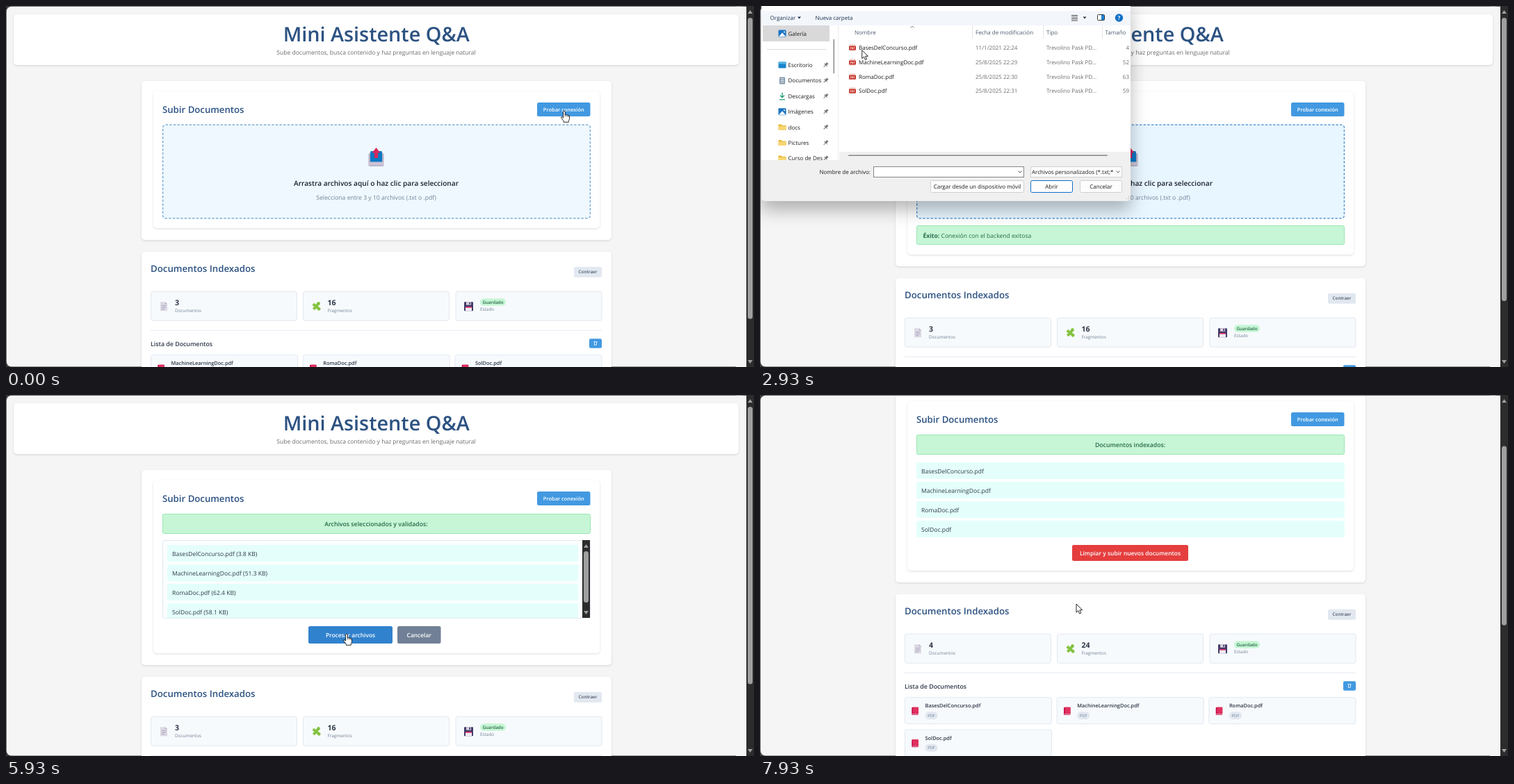
An HTML page that plays this animation: 1076 px wide and 520 px high, repeating every 8 s.

```html
<!DOCTYPE html>
<html lang="es">
<head>
<meta charset="utf-8">
<style>
html, body { margin: 0; width: 100%; height: 100%; overflow: hidden; background: #2c2c2c; }
svg { display: block; }
text { font-family: "Open Sans", "Noto Sans", sans-serif; white-space: pre; text-rendering: geometricPrecision; }
.card { filter: drop-shadow(0 1px 1.5px rgba(0,0,0,.13)); }
.window { filter: drop-shadow(0 13px 12px rgba(0,0,0,.28)); }
</style>
</head>
<body>
<svg id="stage" width="1076" height="520" viewBox="0 0 1076 520"></svg>
<script>
const LOOP = 8000, NAVY = '#2c5282', GREY = '#718096', INK = '#2d3748';
const FILES = [['BasesDelConcurso.pdf', '3.8', '11/1/2021 22:24', 4], ['MachineLearningDoc.pdf', '51.3', '25/8/2025 22:29', 52],
  ['RomaDoc.pdf', '62.4', '25/8/2025 22:30', 63], ['SolDoc.pdf', '58.1', '25/8/2025 22:31', 59]];

const clamp = v => Math.max(0, Math.min(1, v));
const smooth = v => (v = clamp(v), v * v * (3 - 2 * v));
const mix = (a, b, k) => `rgb(${a.map((v, i) => v + (b[i] - v) * k)})`;

const rect = (x, y, w, h, fill, r = 0, more = '') =>
  `<rect x="${x}" y="${y}" width="${w}" height="${h}" rx="${r}" fill="${fill}" ${more}/>`;
const boxed = (x, y, w, h, fill, line, r = 2) =>
  rect(x + .5, y + .5, w - 1, h - 1, fill, r, `stroke="${line}"`);
const text = (x, y, s, size, fill, weight = 400, anchor = 'start') =>
  `<text x="${x}" y="${y}" font-size="${size}" fill="${fill}" font-weight="${weight}" text-anchor="${anchor}">${s}</text>`;
const mid = (x, y, s, size, fill, weight) => text(x, y, s, size, fill, weight, 'middle');
const path = (d, fill, more = '') => `<path d="${d}" fill="${fill}" ${more}/>`;
const line = (d, color, w = 1) => path(d, 'none', `stroke="${color}" stroke-width="${w}"`);
const at = (x, y, s) => `<g transform="translate(${x} ${y})">${s}</g>`;
const clip = (x, y, w, h, s) => `<svg x="${x}" y="${y}" width="${w}" height="${h}" viewBox="${x} ${y} ${w} ${h}">${s}</svg>`;
const card = (x, y, w, h, r = 5) => rect(x, y, w, h, '#fff', r, 'class="card"');
const button = (x, y, w, h, fill, s, size, color = '#fff') =>
  rect(x, y, w, h, fill, 2.5) + mid(x + w / 2, y + h / 2 + size * .36, s, size, color, 600);

function scrollbar(x, y, h, top, len) {
  const c = x + 5.5, b = y + h;
  return rect(x, y, 11, h, '#2c2c2c') + rect(x + 2, top, 7, len, '#9f9f9f', 3.5) +
    path(`M${c - 3.5} ${y + 11}h7l-3.5 -5zM${c - 3.5} ${b - 10}h7l-3.5 5z`, '#9f9f9f');
}

const ICON = {
  upload: rect(-11, -6, 22, 19, '#b9b1c4', 2) + rect(-8.5, -9, 17, 17, '#0b78c4', 1.5) + rect(-10.5, 6.5, 21, 5, '#cdc4d6', 1) +
    path('M0-14 6-6.5H2.6V1h-5.2v-7.5H-6z', '#d8285c'),
  page: path('M-5-6.5H2L5-3.5V6.5H-5z', '#dcd8e4') + path('M2-6.5V-3.5H5z', '#b4acbc') + line('M-3-1H3M-3 1.5H3M-3 4H1', '#a9a3b8', .9),
  puzzle: `<g transform="rotate(40)">${line('M-5.5 0H5.5M0-5.5V5.5', '#84c341', 4)}
    <g fill="#84c341"><circle cx="0" cy="-5.5" r="2.4"/><circle cx="5.5" cy="0" r="2.4"/></g></g>`,
  disk: rect(-6.5, -6.5, 13, 13, '#433b6b', 1) + rect(-3.5, -6.5, 7, 4.5, '#d5d0dc') + rect(.8, -5.8, 1.6, 3, '#433b6b') +
    rect(-4.5, .3, 9, 6.2, '#f0ecf5') + rect(-4.5, .3, 9, 1.6, '#d8285c'),
  book: rect(-4.7, -5.5, 9.5, 11, '#ca0b4a', 1) + rect(-3, -5.5, 7.8, 9, '#e0315f', .5) + line('M-3.7 4.3H4.5', '#f0dbe4', .7),
  pdf: rect(-4.5, -5, 9, 10, '#f3d9d6', 1) + rect(-5, -2.5, 10, 6, '#c8372d', .8) + mid(0, 2, 'PDF', 3.6, '#fff', 700),
  folder: path('M-5.5-4h4l1.5 1.5h5.5V4h-11z', '#e8b93c') + rect(-5.5, -1.5, 11, 5.5, '#f7d674', .8),
  desktop: rect(-5.5, -4.5, 11, 9, '#1b84c8', 1) + rect(-5.5, -4.5, 11, 3, '#55b7e6', 1),
  papers: rect(-4, -5, 8, 10, '#7c93a8', 1) + line('M-2.5-2.5h5M-2.5 0h5M-2.5 2.5h5', '#fff', 1),
  down: line('M0-5V2M-3-1 0 2 3-1M-4 5H4', '#1f9d76', 1.3),
  photo: rect(-5.5, -5, 11, 10, '#1b74c5', 1.2) + path('M-5 4.5 0-1 5 4.5z', '#fff') + rect(2, -3, 2, 2, '#fff', 1),
  pin: `<g transform="rotate(45)">${rect(-1.5, -4, 3, 4, '#777')}${line('M-3 0H3M0 0V4', '#777', 1)}</g>`,
  arrow: path('M0 0V12.2L2.8 9.6 4.7 14 6.8 13.1 4.9 8.8H8.7z', '#fff', 'stroke="#111" stroke-width=".9" stroke-linejoin="round"'),
  hand: path('M-1.4 1Q0-.8 1.3 1V6Q2.6 4.9 3.7 6.2 5 5.4 5.8 6.8 7.2 6.2 7.5 8V11.5Q7.2 13.2 6.3 14.3V16.3H-.7V14.8L-4.3 10.2Q-4.6 8.2-2.8 8.8L-1.4 10.2z',
    '#fff', 'stroke="#111" stroke-width=".9" stroke-linejoin="round"') + line('M1.3 5.5V8.5M3.7 6.2V8.7M5.8 6.8V9', '#111', .6)
};

// Pointer tip: time, x, y
const TRACK = [[0, 803, 151], [480, 803, 151], [600, 700, 190], [670, 654, 202], [770, 608, 209], [870, 588, 210], [930, 572, 210],
  [1530, 572, 210], [1750, 500, 203], [2270, 273, 163], [2470, 215, 115], [2900, 150, 65], [3200, 124, 53], [3600, 124, 53], [3804, 175, 88],
  [4000, 215, 130], [4130, 235, 138], [4400, 424, 264], [4470, 424, 264], [4930, 446, 263], [5610, 446, 263], [5900, 490, 344],
  [6250, 490, 344], [6600, 455, 301], [LOOP, 455, 301]];
function pointer(t) {
  const i = Math.max(1, TRACK.findIndex(k => k[0] >= t)), [a, b] = [TRACK[i - 1], TRACK[i]];
  const k = clamp((t - a[0]) / (b[0] - a[0]));
  return [a[1] + (b[1] - a[1]) * k, a[2] + (b[2] - a[2]) * k];
}

function uploadBody(t) {
  const hover = t < 600 ? clamp(.6 - t / 300) : smooth((t - 590) / 300);
  return rect(225.6, 171.1, 614.8, 134.8, mix([247, 250, 252], [232, 246, 255], hover), 4,
      `stroke="${mix([160, 188, 214], [58, 135, 204], hover)}" stroke-width="1.2" stroke-dasharray="3.4 2.25"`) +
    at(532.5, 218, ICON.upload) +
    mid(532.5, 259, 'Arrastra archivos aquí o haz clic para seleccionar', 10.15, '#1a202c', 600) +
    mid(532.5, 279, 'Selecciona entre 3 y 10 archivos (.txt o .pdf)', 8.6, GREY) +
    (t < 270 ? '' : boxed(225, 316, 616, 28, '#c6f6d5', '#9ae6b4') +
      text(234.5, 333.5, '<tspan font-weight="700">Éxito:</tspan> Conexión con el backend exitosa', 8.55, '#276749'));
}

const banner = s => boxed(225, 171, 616, 29, '#c6f6d5', '#9ae6b4') + mid(532.5, 189, s, 8.72, '#276749', 600);
const rows = (x, y, w, label) => FILES.map((f, i) =>
  rect(x, y + 28 * i, w, 24, '#e4fffb', 2) + text(x + 7, y + 15.5 + 28 * i, label(f), 8.55, INK)).join('');

function pickedBody(t, working) {
  const spin = (t - 6300) * .36;
  return banner('Archivos seleccionados y validados:') + boxed(225, 209, 616, 113, '#fbfdfe', '#e2e8f0') +
    clip(226, 210, 603, 111, rows(232, 216, 591, f => `${f[0]} (${f[1]} KB)`)) + scrollbar(829, 209, 112, 225, 74) +
    (working ? button(447, 333, 101.5, 25, '#a0aec0', 'Procesando...', 8.4) + button(555.5, 333, 62.5, 25, '#a0aec0', 'Cancelar', 8.4) +
      `<circle cx="533" cy="388" r="6" fill="none" stroke="#e2e8f0" stroke-width="1.5"/>` +
      at(533, 388, `<g transform="rotate(${spin})">${line('M-4.24-4.24A6 6 0 0 1 4.24-4.24', '#3f93dc', 1.6)}</g>`) +
      mid(532.5, 411.5, 'Procesando archivos y construyendo índice...', 8.45, '#4a5568')
    : button(435, 333, 121, 25, t > 5850 ? '#3182ce' : '#4299e1', 'Procesar archivos', 8.4) +
      button(563, 333, 62.5, 25, GREY, 'Cancelar', 8.4));
}

const doneBody = () => banner('Documentos indexados:') + rows(225, 211, 616, f => f[0]) +
  button(449, 330, 167, 23, '#e53e3e', 'Limpiar y subir nuevos documentos', 8.45);

function indexed(fresh) {
  const stat = (x, icon, body) => boxed(x, 57, 211, 43, '#f7fafc', '#e2e8f0', 3) + at(x + 19, 79, ICON[icon]) + body;
  const count = (x, n, s) => text(x, 77, n, 10.6, INK, 700) + text(x, 87, s, 6.4, GREY);
  const docs = fresh ? FILES : FILES.slice(1);
  return card(195, 0, 676, fresh ? 260 : 214) + text(208, 29.8, 'Documentos Indexados', 13.25, NAVY, 600) +
    button(817, 22, 40, 15, '#e2e8f0', 'Contraer', 6.3, '#4a5568') +
    stat(208, 'page', count(243, fresh ? 4 : 3, 'Documentos')) +
    stat(427, 'puzzle', count(462.5, fresh ? 24 : 16, 'Fragmentos')) +
    stat(646.5, 'disk', rect(682, 67.5, 37, 10.5, '#c6f6d5', 5.2) + mid(700.5, 75, 'Guardado', 6.3, '#276749', 600) + text(682, 85.7, 'Estado', 6.4, GREY)) +
    rect(208, 113, 649, 1, '#e2e8f0') + text(208, 136, 'Lista de Documentos', 8.8, INK, 600) +
    rect(839, 125.5, 18, 13.5, '#4299e1', 2) + line('M846.5 130v4.5M849.5 130v4.5M845.5 130h5M846 134.5h3', '#fff', .8) +
    docs.map((f, i) => at(208 + i % 3 * 218.7, 148.5 + (i / 3 | 0) * 46.5, boxed(0, 0, 212, 39, '#f7fafc', '#e2e8f0', 3) +
      at(15, 20, ICON.book) + text(29.5, 15, f[0], 7.4, INK, 600) +
      rect(29.5, 21, 18, 11, '#e2e8f0', 5) + mid(38.5, 28.7, 'PDF', 5.8, GREY))).join('');
}

function page(t) {
  // Stage layout: end of inner card, page height, body
  const fresh = t >= 7400;
  const [end, height, body] = t < 270 ? [320, 585, uploadBody(t)] : t < 5400 ? [358, 622, uploadBody(t)] :
    t < 6270 ? [372, 635, pickedBody(t)] : t < 7330 ? [440, 703, pickedBody(t, true)] : [367, fresh ? 983 : 631, doneBody()];
  const scroll = 114 * smooth((t - 7740) / 194), press = t < 560 ? clamp(t / 200) : clamp(1 - (t - 560) / 200);
  return rect(0, 0, 1076, 520, '#3a3a3a') + rect(.7, .8, 1065, 518.8, '#f5f5f5', 7) + rect(1050, .8, 15, 520, '#f5f5f5') +
    clip(1, 1, 1064, 519, at(0, -scroll, card(11, 12, 1043, 73) + mid(532.7, 51, 'Mini Asistente Q&amp;A', 28.8, NAVY, 600) +
      mid(532.5, 70, 'Sube documentos, busca contenido y haz preguntas en lenguaje natural', 8.55, '#6b6b6b') +
      card(195, 108, 676, end - 91) + card(212, 123, 642, end - 123) +
      text(225, 154.3, 'Subir Documentos', 13.2, NAVY, 600) +
      button(764, 139, 76.5, 20, mix([66, 153, 225], [49, 130, 206], press), 'Probar conexión', 7.45) +
      body + at(0, end + 33.7, indexed(fresh)))) +
    scrollbar(1065, 0, 520, 17 + scroll * 488 / height, 488 * 520 / height);
}

function dialog(t) {
  const S = 8, dark = '#1b1b1b', soft = '#6d6d6d', chevron = (x, y) => line(`M${x - 2.5} ${y - 1}l2.5 2.5 2.5-2.5`, '#444', .9);
  const tip = pointer(t - 30), dragging = t > 3600 && t < 4070;
  const reach = t < 3330 ? 0 : Math.max(60, t < 4070 ? tip[1] : 130);
  const places = [['Escritorio', 'desktop'], ['Documentos', 'papers'], ['Descargas', 'down'], ['Imágenes', 'photo'],
    ['docs', 'folder'], ['Pictures', 'folder'], ['Curso de Des', 'folder']];
  const side = places.map(([s, icon], i) => {
    const y = 85 + 22.4 * i;
    return at(32, y, ICON[icon]) + text(40.5, y + 3, s, S, dark) + at(94.5, y, ICON.pin);
  }).join('');
  const list = t < 2450 ? '' : FILES.map(([name, , date, size], i) => {
    const y = Math.round(60 + 20.8 * i), on = reach >= y - 9, ink = on ? dark : soft;
    const back = on ? boxed(124, y - 9, 412, 18, '#cce8ff', i ? '#6cb2e6' : '#35729f', 0) :
      !i && t > 3130 ? rect(124, y - 9, 410, 18, '#e5f3ff') : '';
    return back + at(133, y, ICON.pdf) + text(142, y + 3, name, S, dark) + text(310, y + 3, date, S, ink) +
      text(412, y + 3, 'Trevolino Pask PD...', S, ink) + text(531, y + 3, size, S, ink, 400, 'end');
  }).join('');
  const chosen = FILES.filter((f, i) => reach >= 51 + 20.8 * i).map(f => `"${f[0]}"`).join(' ');
  const act = (x, w, s, edge, fill = '#fdfdfd') => boxed(x, 251, w, 18, fill, edge, 2) + mid(x + w / 2, 263, s, S, dark);
  const body = rect(2, -9, 531, 290, '#f0f0f0', 5) + rect(2, 0, 531, 7, '#fff') + rect(2, 7, 531, 21, '#f3f6fb') + rect(2, 28, 531, 194, '#fff') +
    text(14.5, 20, 'Organizar', S, '#1b3350') + path('M54 15.5h5l-2.5 3z', '#1b3350') + text(79.5, 20, 'Nueva carpeta', S, '#1b3350') +
    line('M448 13.5h9M448 16h9M448 18.5h9M448 21h9', '#333', .9) + path('M464.5 15.5h5l-2.5 3z', '#333') +
    boxed(485, 12, 11, 9, '#fff', '#333', 1) + rect(491, 13, 4, 7, '#1b84d8') +
    `<circle cx="516.5" cy="17" r="5.7" fill="#0f6fc6"/>` + mid(516.5, 20, '?', 8, '#fff', 700) +
    rect(4, 28, 96, 23, '#d9d9d9') + at(32, 39.5, ICON.photo) + text(40.5, 42.7, 'Galería', S, dark) + rect(10, 62, 85, 1, '#dcdcdc') +
    clip(4, 64, 97, 158, side) + rect(105.5, 48, 1.5, 49, '#8a8a8a') + rect(112, 28, 1, 194, '#ececec') +
    line('M216.5 31.5l2.5-2.5 2.5 2.5', '#666', .8) +
    [[136, 'Nombre'], [310, 'Fecha de modificación'], [412, 'Tipo'], [496.5, 'Tamaño']].map(([x, s]) => text(x, 41, s, S, '#4c5a6e')).join('') +
    [305, 407, 492].map(x => rect(x, 28, 1, 19, '#e5e5e5')).join('') +
    clip(113, 47, 420, 163, list + (dragging ? boxed(124, 53, Math.max(2, tip[0] - 124), Math.max(2, tip[1] - 53), 'rgba(0,120,215,.45)', '#2e8ad8', 0) : '')) +
    rect(114, 210, 419, 12, '#f0f0f0') + rect(127, 214.5, 373, 1.6, '#858585', .8) +
    text(159, 241.5, 'Nombre de archivo:', S, dark, 400, 'end') + boxed(163, 231, 217, 16, '#fff', '#858585', 0) +
    clip(165, 232, 193, 14, text(165.5, 241.5, chosen, 7.93, dark)) + chevron(374, 238.5) +
    boxed(389, 231, 132, 16, '#fdfdfd', '#d0d0d0', 0) + clip(390, 232, 119, 14, text(391, 241.5, 'Archivos personalizados (*.txt;*.pdf)', S, dark)) + chevron(515, 238.5) +
    act(245, 135, 'Cargar desde un dispositivo móvil', '#d0d0d0') +
    act(389, 61, 'Abrir', '#0f6fc6', t > 4360 ? '#e0eef9' : '#fdfdfd') + act(460, 61, 'Cancelar', '#d0d0d0') +
    path('M530 274h1v1h-1zM530 277h1v1h-1zM527 277h1v1h-1z', '#999');
  const shown = t < 4500 ? (t < 2390 ? .5 : 1) : clamp(1 - (t - 4470) / 150);
  return `<g class="window" opacity="${shown}">${body}</g>`;
}

const stage = document.getElementById('stage');
function draw(now) {
  const t = Math.floor((now % LOOP + 4) * .015) / .015 + 4; // 15 steps per second
  const hand = t < 1270 || (t > 5840 && t < 6270);
  stage.innerHTML = page(t) + (t > 2330 && t < 4620 ? dialog(t) : '') + at(...pointer(t), hand ? ICON.hand : ICON.arrow);
}
let start;
function tick(now) {
  draw(now - (start ??= now));
  requestAnimationFrame(tick);
}
requestAnimationFrame(tick);
</script>
</body>
</html>
```
